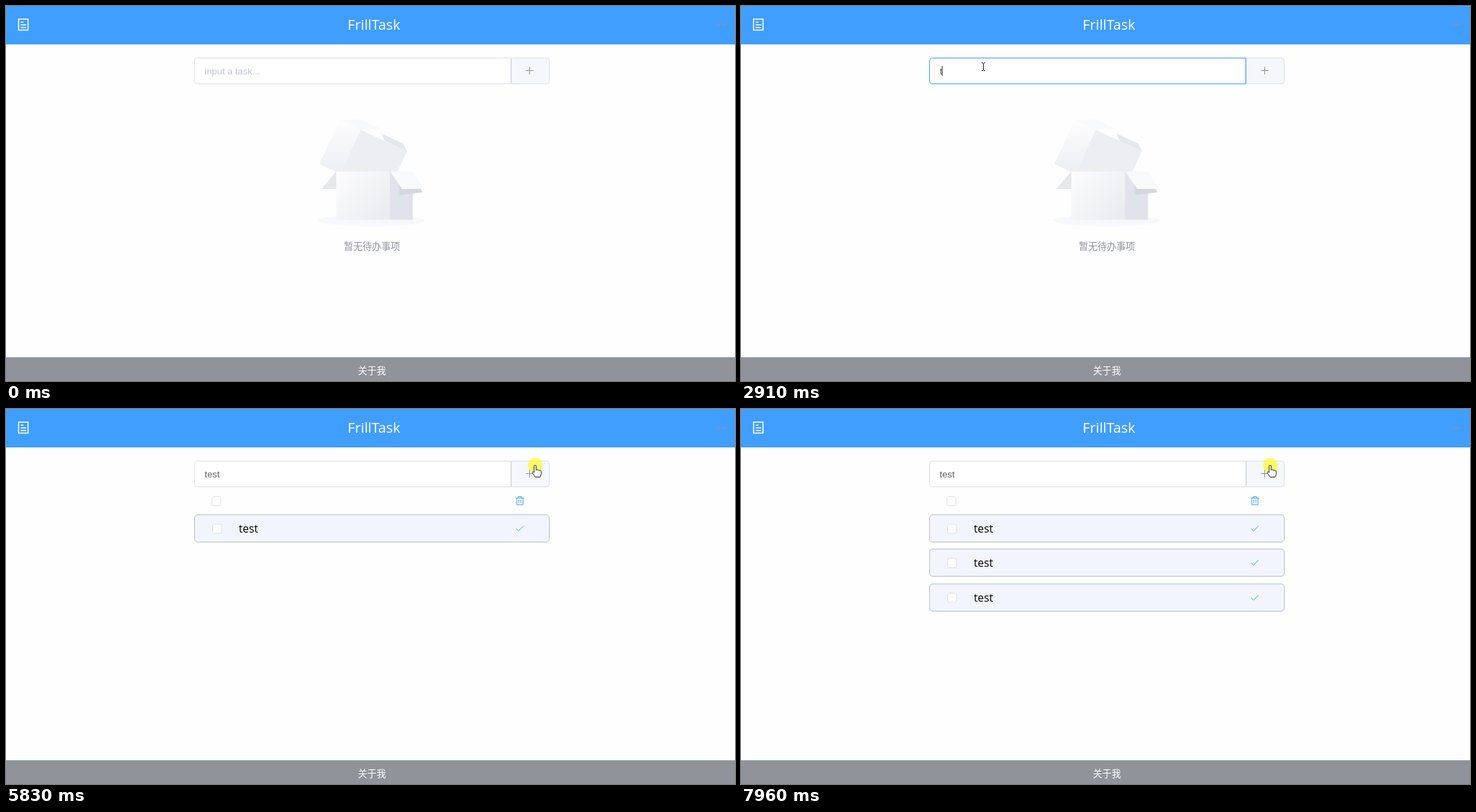
An HTML page that plays this animation: 1042x537 px, repeating every 8000 ms.

```html
<!DOCTYPE html>
<html lang="zh-CN">
<head>
<meta charset="utf-8">
<title>To-do list</title>
<style>
  html, body { margin: 0; width: 100%; height: 100%; overflow: hidden; background: #fefefe; }
  svg { display: block; width: 100vw; height: 100vh; }
  text { font-family: "Open Sans", "Noto Sans", sans-serif; }
  .cjk { font: 13.4px "Noto Sans CJK SC", "Noto Sans CJK JP", "Noto Sans CJK", sans-serif; text-anchor: middle; }
  .field { font: 13.3px "Liberation Sans", Arial, sans-serif; }
  .line { fill: none; stroke-width: 1; }
  .box { fill: #fff; stroke: #dcdfe6; }
  .blue { stroke: #409eff; }
  .cursor { fill: #fff; stroke: #222; stroke-linejoin: round; }
</style>
</head>
<body>
<svg viewBox="0 0 1042 537" preserveAspectRatio="none">
  <defs>
    <linearGradient id="lidShade" x1=".3885" y1="0" x2=".6115" y2="1">
      <stop stop-color="#fcfcfd"/><stop offset="1" stop-color="#eeeff3"/>
    </linearGradient>
    <linearGradient id="boxShade" x1="0" y1=".095" x2="1" y2=".905">
      <stop stop-color="#fcfcfd"/><stop offset="1" stop-color="#e9ebef"/>
    </linearGradient>
  </defs>

  <rect width="1042" height="55" fill="#409eff"/>
  <path class="line" stroke="#fff" style="stroke-width:1.5" d="M18 18.8H31.5V34.5H18ZM21 23.2H25M21 27H29M21 30.8H29"/>
  <text x="526" y="34" font-size="20.3" fill="#fff" text-anchor="middle">FrillTask</text>
  <g fill="#909399"><circle cx="1018.5" cy="27" r="1.3"/><circle cx="1023" cy="27" r="1.3"/><circle cx="1027.5" cy="27" r="1.3"/></g>

  <rect y="503" width="1042" height="34" fill="#909399"/>
  <text class="cjk" x="523" y="527" fill="#fff">关于我</text>

  <g id="empty">
    <g transform="translate(447 150.4) scale(1.924)">
      <path fill="#f7f8fc" d="M39.5 86C61.3 86 79 83.9 79 81.3S57.3 78 35.5 78 0 78.8 0 81.3 17.7 86 39.5 86Z"/>
      <path fill="#e5e7e9" d="M13 45H53L42 58H2Z"/>
      <g transform="translate(34.5 31.5) scale(-1 1) rotate(-25) translate(-27.5 -21.5)">
        <path fill="#e5e7e9" d="M0 7H18L23 3H5Z"/>
        <path fill="#edeef2" d="M0 7H38V43H0Z"/>
        <rect fill="url(#lidShade)" transform="translate(93) scale(-1 1)" x="38" y="7" width="17" height="36"/>
        <path fill="#f8f9fb" d="M55 7H38L24 0H41Z"/>
      </g>
      <rect fill="url(#boxShade)" x="13" y="45" width="40" height="36"/>
      <path fill="#e0e3e9" d="M53 45H70V81H53Z"/>
      <path fill="#d5d7de" d="M60 54V62.6L77 60.6 75.5 57Z"/>
      <path fill="#f8f9fb" d="M70 45H53L62 58H78Z"/>
    </g>
    <text class="cjk" x="523" y="349" fill="#909399">暂无待办事项</text>
  </g>

  <path fill="#f5f7fa" stroke="#dcdfe6" d="M722.5 74.5H772.5a4 4 0 0 1 4 4V107.5a4 4 0 0 1-4 4H722.5Z"/>
  <path class="line" stroke="#909399" d="M743 92.5H754M748.5 87V98"/>
  <path id="field" fill="#fff" d="M721.5 74.5H273.5a4 4 0 0 0-4 4V107.5a4 4 0 0 0 4 4H721.5Z"/>
  <text id="typed" class="field" x="284" y="97.5"></text>
  <path id="caret" class="line" stroke="#333" d="M.5 86V100"/>

  <g id="list">
    <rect class="box" x="294.5" y="125.5" width="12.5" height="13" rx="2"/>
    <path class="line blue" d="M728.5 127.5H740.5M732.5 127.5V125.5H736.5V127.5M730 127.5V137H739V127.5M733 130V134.5M736 130V134.5"/>
    <g id="rows"></g>
  </g>

  <circle id="click" r="10.5" fill="#ff0" fill-opacity=".6"/>
  <path id="arrow" class="cursor" d="M.5 0V12.2L3.4 9.6 5.2 13.4 7 12.6 5.3 8.9H8.8Z"/>
  <path id="beam" class="line" stroke="#222" d="M-2.5-5.5H-.5M.5-5.5H2.5M0-5V5M-2.5 5.5H-.5M.5 5.5H2.5"/>
  <path id="hand" class="cursor" d="M-1.6 10.5V1.6a1.5 1.5 0 0 1 3 0V7c.3-1 2.6-.8 2.7.4 .5-.8 2.5-.5 2.5.7 .6-.6 2-.2 2 1V12.5L7 17H0L-4.2 11c-.8-1.4 1-2.2 2.6-.5Z"/>
</svg>
<script>
const LOOP = 8000;
const FOCUS = 1550, BLUR = 4760, LEAVE = 4830, LISTED = 5080;
const CLICKS = [FOCUS, BLUR, 5830, 7010, 7960];
const KEYS = [2910, 3170, 3350, 3540];
const ROW_STARTS = [null, 6050, 7180];   // the first row appears with the list

const $ = id => document.getElementById(id);
const clamp = v => Math.max(0, Math.min(1, v));
const progress = (t, start, length) => clamp((t - start) / length);
const easeOut = p => 1 - (1 - p) ** 2;
const easeInOut = p => p * p * (3 - 2 * p);
const mix = (a, b, p) => a + (b - a) * p;
const show = (el, on) => el.style.display = on ? '' : 'none';
const move = (el, x, y) => el.setAttribute('transform', `translate(${x} ${y})`);

$('rows').innerHTML = ROW_STARTS.map(() => `<g>
  <rect x="269.5" y=".5" width="507" height="39" rx="4.5" fill="#f2f5fd" stroke="#b9bfce"/>
  <rect class="box" x="295.5" y="14" width="12.5" height="13" rx="2"/>
  <text x="332.7" y="26" font-size="15.8">test</text>
  <path class="line" d="M729 20.2L732.6 23.7 739.5 16.7"/>
</g>`).join('');
const rows = [...$('rows').children];

function drawField(t) {
  const count = KEYS.filter(k => t >= k).length;
  const focus = progress(t, FOCUS, 150) - progress(t, BLUR, 120);
  const rgb = [[220, 64], [223, 158], [230, 255]].map(([a, b]) => mix(a, b, focus));
  $('field').setAttribute('stroke', `rgb(${rgb})`);

  const typed = $('typed');
  typed.textContent = count ? 'test'.slice(0, count) : 'input a task...';
  typed.setAttribute('fill', count ? '#606266' : '#c0c4cc');
  const width = count ? typed.getComputedTextLength() : 0;
  const blinkOff = t >= 2100 && t < 2660 || t >= 4090 && t < 4580;
  show($('caret'), t >= FOCUS + 50 && t < BLUR && !blinkOff);
  move($('caret'), Math.floor(284 + width), 0);
}

function drawList(t) {
  const leave = progress(t, LEAVE, LISTED - LEAVE);
  const scale = 1 + leave * .1;
  $('empty').setAttribute('opacity', 1 - leave);
  $('empty').setAttribute('transform', `translate(523 245) scale(${scale}) translate(-523 -245)`);

  show($('list'), t >= LISTED);
  rows.forEach((row, i) => {
    const start = ROW_STARTS[i];
    const p = start ? easeOut(progress(t, start, 480)) : 1;
    row.setAttribute('opacity', p);
    row.lastElementChild.setAttribute('stroke', p < 1 ? '#909399' : '#409eff');
    move(row, 0, Math.round(151 + i * 49.4) - 9 * (1 - p));
  });
}

function pointer(t) {
  if (t < 4040) {
    const p = easeInOut(progress(t, 440, 790));
    return [mix(865, 346.5, p), mix(441, 87, p)];
  }
  const p = easeOut(progress(t, 4040, 370));
  return [mix(468.5, 756.5, p), 66 - 5 * p * (1 - p) + 13.5 * p ** 6 + (t >= 5830 ? 1 : 0)];
}

function drawPointer(t) {
  const [x, y] = pointer(t);
  const inBar = y > 74 && y < 112 && x > 269 && x < 777;
  const kind = !inBar ? 'arrow' : x < 722 ? 'beam' : 'hand';
  for (const id of ['arrow', 'beam', 'hand']) {
    show($(id), t >= 470 && id === kind);
    move($(id), x, y);
  }
  show($('click'), CLICKS.some(c => t >= c && t < c + 100));
  move($('click'), x, y);
}

function frame(now) {
  const t = now % LOOP;
  drawField(t);
  drawList(t);
  drawPointer(t);
  requestAnimationFrame(frame);
}
const begin = performance.now();
const tick = () => Math.max(0, performance.now() - begin);
requestAnimationFrame(function loop() {
  const t = tick() % LOOP;
  drawField(t);
  drawList(t);
  drawPointer(t);
  requestAnimationFrame(loop);
});
</script>
</body>
</html>
```
